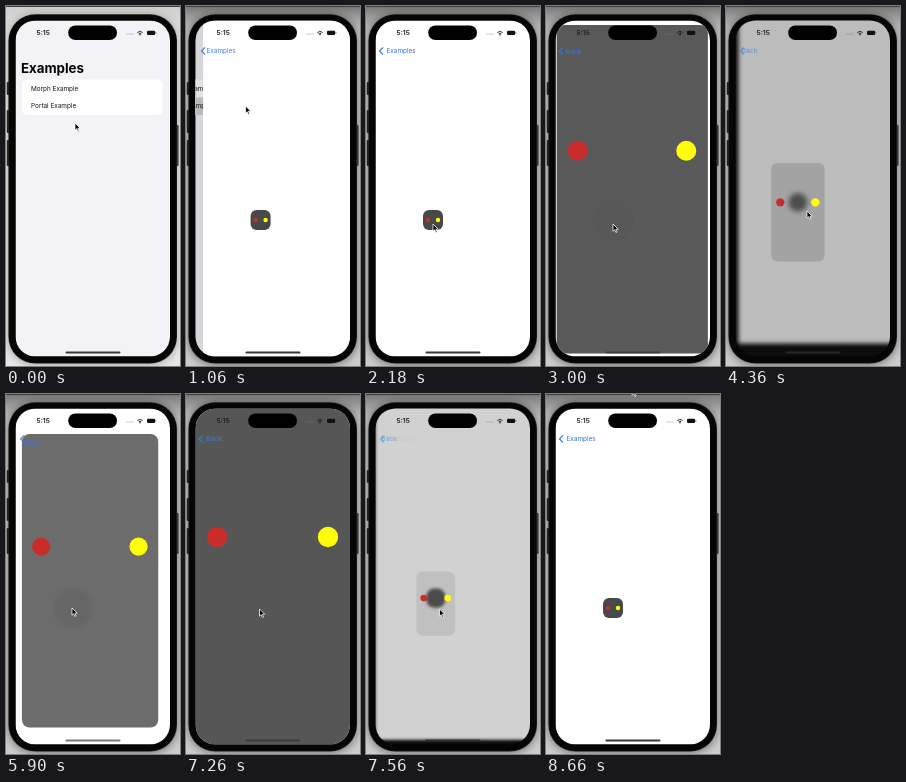
Write an HTML page with a canvas that moves like this. It is 174 px wide and 360 px high and loops after 8680 ms.

```html
<!DOCTYPE html>
<html lang="en">
<head>
<meta charset="utf-8">
<title>Portal transition</title>
<style>
  html, body { margin: 0; width: 100%; height: 100%; overflow: hidden; background: #c4c4c4; }
  canvas { display: block; width: 174px; height: 360px; }
</style>
</head>
<body>
<canvas id="stage"></canvas>
<script>
const LOOP = 8680, BLUE = '#3478dc', FONT = 'Inter, Arial, sans-serif';
const SCREEN = { x: 9.5, y: 14.4, w: 154.5, h: 336.2 };
const canvas = document.getElementById('stage');
const scale = window.devicePixelRatio || 1;
canvas.width = 174 * scale;
canvas.height = 360 * scale;
const ctx = canvas.getContext('2d');

// Cursor stops: start, end, tip position on arrival.
const START = [69, 117];
const MOVES = [
  [20, 720, 59.5, 100], [1540, 2180, 67, 218], [3420, 3940, 81, 205],
  [4960, 5320, 66, 214], [6520, 6680, 73, 214.5], [6850, 6870, 73.5, 215], [8280, 8660, 86, -6]
];
const PUSH = 800;
const TOGGLES = [[2555, true], [4146, false], [5622, true], [7285, false]];

const clamp = v => Math.max(0, Math.min(1, v));
const mix = (a, b, k) => a + (b - a) * k;
const ease = k => k * k * (3 - 2 * k);
const spring = (ms, omega) => {
  const x = Math.max(0, ms) / 1000 * omega;
  return x > 10 ? 1 : 1 - (1 + x) * Math.exp(-x);
};

function box(x, y, w, h, r, fill) {
  ctx.beginPath();
  ctx.roundRect(x, y, w, h, r);
  ctx.fillStyle = fill;
  ctx.fill();
}
function disc(x, y, r, fill) {
  ctx.beginPath();
  ctx.arc(x, y, r, 0, Math.PI * 2);
  ctx.fillStyle = fill;
  ctx.fill();
}
function label(str, x, y, size, fill, weight = 400) {
  ctx.font = `${weight} ${size}px ${FONT}`;
  ctx.textBaseline = 'middle';
  ctx.fillStyle = fill;
  ctx.fillText(str, x, y);
}
function faded(alpha, draw) {
  if (alpha <= 0.002) return;
  ctx.save();
  ctx.globalAlpha *= clamp(alpha);
  draw();
  ctx.restore();
}
function blurred(radius, draw) {
  ctx.save();
  if (radius > 0.05) ctx.filter = `blur(${radius * scale}px)`;
  draw();
  ctx.restore();
}

function drawPhone(focused) {
  ctx.fillStyle = focused ? '#cdcdcd' : '#e8e8e8';
  ctx.fillRect(0, 0, 174, 360);
  const top = ctx.createLinearGradient(0, 0, 0, 30);
  top.addColorStop(0, focused ? 'rgba(80,80,80,.7)' : 'rgba(150,150,150,.3)');
  top.addColorStop(1, 'rgba(120,120,120,0)');
  ctx.fillStyle = top;
  ctx.fillRect(0, 0, 174, 30);
  ctx.fillStyle = '#3c3c3c';
  ctx.fillRect(0, 0, 174, 1);

  for (const [y, h] of [[76, 13], [104, 23], [134, 26]])
    box(0.8, y, 2.5, h, 1, '#2a2a2a');
  box(170, 119, 2.6, 41, 1, '#4a4a4a');
  ctx.save();
  ctx.shadowColor = focused ? 'rgba(0,0,0,.5)' : 'rgba(0,0,0,.3)';
  ctx.shadowBlur = 10 * scale;
  ctx.shadowOffsetY = scale;
  box(2.4, 8.2, 168.6, 349.4, 27, '#1d1d1d');
  ctx.restore();
  box(3.2, 9, 167, 347.8, 26, '#050505');
}

function drawList(shift, tapped) {
  const { x, y, w, h } = SCREEN;
  ctx.save();
  ctx.translate(-shift * 48, 0);
  box(x, y, w + 50, h, 0, '#f2f2f7');
  faded((1 - shift) ** 2, () => label('Examples', 15, 63, 13.3, '#050505', 700));
  box(16, 73.5, 140.5, 35.5, 5, '#fff');
  if (tapped) box(16, 91.5, 140.5, 17.5, [0, 0, 5, 5], '#d1d1d6');
  label('Morph Example', 25, 83, 6.4, '#161616');
  label('Portal Example', 25, 100.5, 6.4, '#161616');
  ctx.restore();
  faded(shift * 0.12, () => box(x, y, w, h, 0, '#000'));
}

// While closing, the page pulls in from its edges, out of focus over black.
function drawBackdrop(p) {
  const { x, y, w, h } = SCREEN;
  const pull = 4 * p * (1 - p);
  const grey = Math.round(mix(255, 86, p ** 0.66));
  box(x, y, w, h, 0, '#0c0c0c');
  blurred(3.2 * pull, () =>
    box(x - 6 + 12 * pull, y - 14, w + 10 - 10 * pull, h + 24 - 31 * pull, 0, `rgb(${grey},${grey},${grey})`));
}

function drawPortal(p, opening) {
  const { x, y, w, h } = SCREEN;
  if (opening || p < 0.002) box(x, y, w, h, 0, '#fff');
  else drawBackdrop(p);
  faded(p, () => box(mix(57, x, p), mix(204, y, p), mix(20, w, p), mix(20, h, p), 6 + p * 2, '#565656'));

  const dotY = mix(214, 143, p);
  const blobX = opening ? 67 : mix(67, 87, p), blobY = opening ? 214 : dotY;
  const side = 20 + (opening ? 22 : -6) * p;
  faded(opening ? 1 - p : 1 - p * p, () => blurred(14 * p * (1 - p), () =>
    box(blobX - side / 2, blobY - side / 2, side, side, Math.min(side / 2, 6 + 15 * p), '#484848')));
  const r = mix(2.2, 10.2, p);
  disc(mix(62, 31, p), dotY, r, '#c92d2b');
  disc(mix(72, 142, p), dotY, r, '#fffd07');
}

function chevron(x, y) {
  ctx.beginPath();
  ctx.moveTo(x + 3.6, y - 3.6);
  ctx.lineTo(x, y);
  ctx.lineTo(x + 3.6, y + 3.6);
  ctx.strokeStyle = BLUE;
  ctx.lineWidth = 1.2;
  ctx.stroke();
}

function drawNav(p, opening, pushed) {
  const away = 1 - p;
  faded(pushed * (opening ? 1 - 3 * p : away ** 16), () => {
    chevron(13.5 + (1 - pushed) * 40, 45);
    label('Examples', 20.5, 45.3, 6.4, BLUE);
  });
  faded(opening ? p : p ** 0.4, () => {
    chevron(opening ? 13 + away * 12 : 13 + away * 2, 45);
    label('Back', 20.3 - away * (opening ? 20 : 6), 45.5 + (opening ? away * 33 : 0), 6.6, BLUE, 500);
  });
}

function drawStatus(p) {
  label('5:15', 30.5, 26.8, 6.8, '#1c1c1c', 600);
  box(62.2, 19.5, 48.8, 14.5, 7.3, '#000');
  for (let i = 0; i < 4; i++) disc(121 + i * 2, 28, 0.5, '#777');
  ctx.strokeStyle = '#151515';
  ctx.lineWidth = 0.9;
  for (const r of [1.7, 3.5]) {
    ctx.beginPath();
    ctx.arc(134, 29, r, -Math.PI * 0.78, -Math.PI * 0.22);
    ctx.stroke();
  }
  disc(134, 28.8, 0.7, '#151515');
  box(141, 24.7, 8.2, 4.3, 1.3, '#111');
  box(149.6, 26, 0.8, 1.6, 0.4, '#555');
  box(59.5, 345.5, 55, 1.9, 1, `rgba(45,45,45,${mix(0.95, 0.6, p)})`);
}

function drawCursor(t) {
  let [x, y] = START;
  for (const [from, to, nx, ny] of MOVES) {
    const k = ease(clamp((t - from) / (to - from)));
    x = mix(x, nx, k);
    y = mix(y, ny, k);
  }
  ctx.save();
  ctx.translate(x, y);
  ctx.beginPath();
  [[0, 0], [0, 7.2], [1.7, 5.7], [2.9, 8.5], [4.1, 8], [2.9, 5.2], [5.2, 5.2]]
    .forEach(point => ctx.lineTo(...point));
  ctx.closePath();
  ctx.lineJoin = 'round';
  ctx.fillStyle = '#000';
  ctx.fill();
  ctx.strokeStyle = 'rgba(255,255,255,.85)';
  ctx.lineWidth = 0.9;
  ctx.stroke();
  ctx.restore();
}

function portalState(t) {
  let p = 0, opening = true;
  for (const [start, opens] of TOGGLES) {
    if (t < start) break;
    const k = spring(t - start, 4 * Math.PI);
    p = opens ? k : 1 - k;
    opening = opens;
  }
  return { p, opening };
}

function render(t) {
  const { x, y, w, h } = SCREEN;
  const pushed = spring(t - PUSH, 18.26);
  const { p, opening } = portalState(t);
  ctx.setTransform(scale, 0, 0, scale, 0, 0);
  drawPhone(t >= 640);

  ctx.save();
  ctx.beginPath();
  ctx.roundRect(x, y, w, h, 20);
  ctx.clip();
  if (pushed < 1) drawList(pushed, t >= 740);
  if (t >= PUSH) {
    ctx.save();
    ctx.translate((1 - pushed) * w, 0);
    drawPortal(p, opening);
    ctx.restore();
    drawNav(p, opening, pushed);
  }
  drawStatus(p);
  ctx.restore();
  drawCursor(t);
}

const began = performance.now();
function tick() {
  render((performance.now() - began) % LOOP);
  requestAnimationFrame(tick);
}
tick();
</script>
</body>
</html>
```
